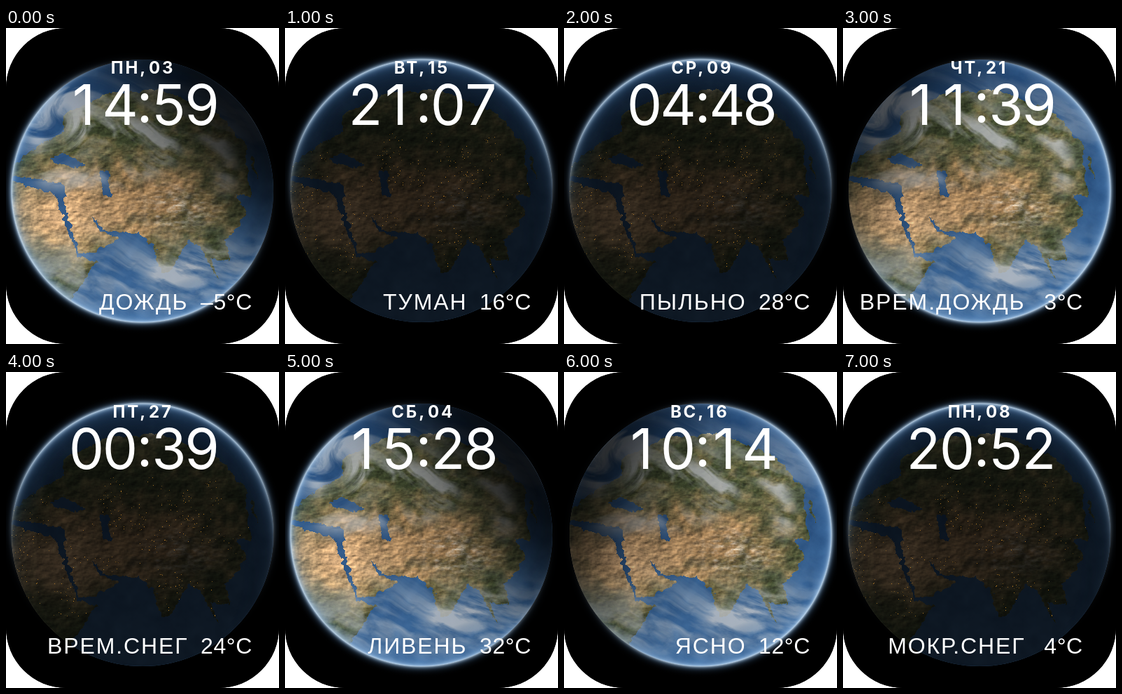
An HTML page with a canvas that plays this animation: 390x450 px, repeating every 8 s.

```html
<!DOCTYPE html>
<html lang="ru">
<head>
<meta charset="utf-8">
<style>
html, body { margin: 0; width: 100%; height: 100%; overflow: hidden; background: #fff; }
canvas, svg { position: absolute; left: 0; top: 0; width: 390px; height: 450px; }
canvas { background: #000; border-radius: 86px; }
text { fill: #fff; }
.clock { font: 400 80px Inter, sans-serif; text-anchor: middle; }
.date { font: 700 24px Inter, sans-serif; letter-spacing: 2.8px; }
.info { font: 32px "Liberation Sans", Arial, sans-serif; letter-spacing: 1.9px; }
.temp { letter-spacing: .6px; text-anchor: middle; }
.end { text-anchor: end; }
</style>
</head>
<body>
<canvas id="stage" width="390" height="450"></canvas>
<svg viewBox="0 0 390 450">
  <text id="day" class="date end" x="202" y="65"></text>
  <text id="num" class="date" x="204" y="65"></text>
  <g id="clock" class="clock"></g>
  <text id="weather" class="info end" x="260.5" y="401"></text>
  <text id="temp" class="info temp" x="315" y="401"></text>
</svg>
<script>
const W = 390, H = 450, CX = 195, CY = 232, R = 187;
const $ = id => document.getElementById(id);

const LAND = `M0 205L45 168 82 150 84 122 150 92 225 88 300 120 342 165 350 240 330 236 343 266 314 303
  318 332 293 326 306 362 278 312 262 303 232 348 222 348 210 308 190 293 140 287 123 265 134 288 160 298
  128 318 105 323 83 248 85 224 50 216 0 210Z
  M0 216L70 237 102 326 131 332 95 380 90 410 0 400Z M352 180L361 218 348 186Z`;
const LAKES = `M62 187L80 177 112 195 96 201Z M134 203L146 202 151 238 141 240Z`;

const clamp = v => Math.min(1, Math.max(0, v));
const mix = (a, b, t) => a.map((v, i) => v + (b[i] - v) * clamp(t));
const bell = (v, center, width) => Math.exp(-(((v - center) / width) ** 2));

function hash(x, y) {
  let h = Math.imul(x, 374761393) + Math.imul(y, 668265263) | 0;
  h = Math.imul(h ^ h >>> 13, 1274126177);
  return ((h ^ h >>> 16) >>> 0) / 4294967296;
}
function noise(x, y) {
  const i = Math.floor(x), j = Math.floor(y), ease = t => t * t * (3 - 2 * t);
  const u = ease(x - i), v = ease(y - j);
  const row = k => hash(i, k) * (1 - u) + hash(i + 1, k) * u;
  return row(j) * (1 - v) + row(j + 1) * v;
}
function fbm(x, y, octaves = 4) {
  let sum = 0, amp = .5;
  while (octaves--) {
    sum += amp * noise(x, y);
    x = x * 2 + 17; y = y * 2 + 31; amp /= 2;
  }
  return sum;
}

function layer() {
  const c = document.createElement('canvas');
  c.width = W; c.height = H;
  return c.getContext('2d', { willReadFrequently: true });
}
// paint(x, y) returns [r, g, b, a]
function paintPixels(g, paint) {
  const img = g.createImageData(W, H);
  for (let y = 0; y < H; y++) for (let x = 0; x < W; x++) img.data.set(paint(x, y), (y * W + x) * 4);
  g.putImageData(img, 0, 0);
  return g.canvas;
}

const mask = layer();
mask.fill(new Path2D(LAND));
mask.globalCompositeOperation = 'destination-out';
mask.fill(new Path2D(LAKES));
const maskData = mask.getImageData(0, 0, W, H).data;

// Coastlines are roughened by a noisy lookup
function isLand(x, y) {
  const shift = seed => 10 * (fbm(x / 7 + seed, y / 7, 3) - .44);
  const sx = Math.round(x + shift(0)), sy = Math.round(y + shift(50));
  return sx >= 0 && sx < W && sy >= 0 && sy < H && maskData[(sy * W + sx) * 4 + 3] > 127;
}

const SAND = [222, 178, 130], BROWN = [150, 118, 80], GREEN = [70, 80, 51], SNOW = [205, 200, 190];
const DEEP = [38, 74, 118], SHALLOW = [72, 118, 168];

const ground = paintPixels(layer(), (x, y) => {
  const rough = fbm(x / 16, y / 16, 5);
  if (!isLand(x, y)) return [...mix(DEEP, SHALLOW, rough * .7 + (y - 260) / 500), 255];
  const arid = 1.1 * bell(y, 245, 60) * bell(x, 160, 140) + (rough - .45) * 1.2;
  const sand = bell(x, 80, 72) * bell(y, 268, 48);
  const snow = bell(x, 245, 50) * bell(y, 258, 30) * (fbm(x / 9, y / 4) - .4) * 2
    + bell(y, 72, 20) * rough;
  const relief = fbm(x / 9, y / 6) - fbm((x + 2) / 9, (y + 2) / 6);
  const tone = .72 + rough * .6 + relief * 1.1;
  return [...mix(mix(mix(GREEN, BROWN, arid), SAND, sand), SNOW, snow).map(v => v * tone), 255];
});

function makeClouds() {
  const g = layer();
  g.lineCap = 'round';
  g.filter = 'blur(9px)';
  g.lineWidth = 24;
  g.strokeStyle = '#fffc';
  g.stroke(new Path2D(`M55 216Q150 218 195 200T235 165Q160 125 105 165
    M45 165Q40 120 78 98T105 140 M290 145Q320 170 314 225 M225 350Q265 335 310 320`));
  const cover = g.getImageData(0, 0, W, H).data;
  return paintPixels(layer(), (x, y) => {
    const dx = x - 78, dy = y - 125, turn = 3 * Math.exp(-Math.hypot(dx, dy) / 45) - .3;
    const u = dx * Math.cos(turn) - dy * Math.sin(turn), v = dx * Math.sin(turn) + dy * Math.cos(turn);
    const bend = 2 * fbm(u / 60, v / 60, 3);
    const wisp = fbm(u / 48 + bend, v / 14 + bend, 5);
    const climate = .4 * bell(y, 125, 50) + .6 * bell(y, 355, 50);
    const amount = (cover[(y * W + x) * 4 + 3] / 300 + climate) * clamp((wisp - .27) * 2.8);
    return [196, 199, 202, 255 * Math.min(.8, amount)];
  });
}
const clouds = makeClouds();

// Smooth falloff from the sunlit edge (0) to the opposite edge (1)
const falloff = (t, mid, steep) => 1 / (1 + Math.exp((t - mid) * steep));

function ramp(g, angle, color) {
  const dx = Math.cos(angle) * R, dy = Math.sin(angle) * R;
  const fill = g.createLinearGradient(CX + dx, CY + dy, CX - dx, CY - dy);
  for (let t = 0; t <= 1; t += .05) fill.addColorStop(t, color(t));
  return fill;
}

// Bright limb and outer haze on the side facing the sun
function atmosphere(angle, reach) {
  const g = layer();
  const fill = g.createRadialGradient(CX, CY, R - 45, CX, CY, R + 16);
  for (let t = 0; t <= 1; t += .02) {
    const d = t * 61 - 45;
    const alpha = d < 0 ? .25 * Math.exp(d / 15) + .6 * Math.exp(d / 4) : .85 * Math.exp(-d / 5) * (1 - t) * 4;
    const white = Math.exp(-Math.abs(d) / 5);
    const [r, gr, b] = mix([72, 135, 205], [205, 230, 252], white);
    fill.addColorStop(t, `rgba(${r},${gr},${b},${clamp(Math.min(.85, alpha) * clamp(t * 4))})`);
  }
  g.fillStyle = fill;
  g.beginPath();
  g.arc(CX, CY, R + 16, 0, 7);
  g.fill();
  g.globalCompositeOperation = 'destination-in';
  g.fillStyle = ramp(g, angle, t => `rgba(0,0,0,${falloff(t, reach, 11)})`);
  g.fillRect(0, 0, W, H);
  return g.canvas;
}

function cityLights(g) {
  for (let i = 0; i < 1500; i++) {
    const x = Math.floor(hash(i, 1) * W), y = Math.floor(150 + hash(i, 2) * 200);
    if (!isLand(x, y) || fbm(x / 30, y / 30, 2) + hash(i, 3) * .25 < .55) continue;
    g.fillStyle = `rgba(235,160,50,${.15 + .6 * hash(i, 4)})`;
    g.fillRect(x, y, 1, 1);
  }
}

function makeGlobe({ angle, mid, dark, reach, night }) {
  const g = layer();
  g.fillRect(0, 0, W, H);
  g.save();
  g.beginPath();
  g.arc(CX, CY, R, 0, 7);
  g.clip();
  g.drawImage(ground, 0, 0);
  if (!night) g.drawImage(clouds, 0, 0);
  g.globalCompositeOperation = 'multiply';
  g.fillStyle = ramp(g, angle, t => {
    const level = 255 * (dark + (1 - dark) * falloff(t, mid, 10));
    return `rgb(${level},${level},${level})`;
  });
  g.fillRect(0, 0, W, H);
  g.globalCompositeOperation = 'source-over';
  if (night) cityLights(g);
  g.restore();
  g.drawImage(atmosphere(angle, reach), 0, 0);
  return g.canvas;
}

const globes = {
  afternoon: makeGlobe({ angle: 2.4, mid: .74, dark: .06, reach: .58 }),
  later: makeGlobe({ angle: 2.5, mid: .72, dark: .05, reach: .58 }),
  noon: makeGlobe({ angle: .55, mid: .86, dark: .2, reach: .65 }),
  morning: makeGlobe({ angle: .4, mid: .78, dark: .12, reach: .62 }),
  night: makeGlobe({ angle: -Math.PI / 2, mid: -.06, dark: .24, reach: .42, night: true })
};

const scenes = [
  ['ПН', '03', '14:59', 'ДОЖДЬ', '–5', 'afternoon'],
  ['ВТ', '15', '21:07', 'ТУМАН', '16', 'night'],
  ['СР', '09', '04:48', 'ПЫЛЬНО', '28', 'night'],
  ['ЧТ', '21', '11:39', 'ВРЕМ.ДОЖДЬ', '3', 'noon'],
  ['ПТ', '27', '00:39', 'ВРЕМ.СНЕГ', '24', 'night'],
  ['СБ', '04', '15:28', 'ЛИВЕНЬ', '32', 'later'],
  ['ВС', '16', '10:14', 'ЯСНО', '12', 'morning'],
  ['ПН', '08', '20:52', 'МОКР.СНЕГ', '4', 'night']
];

const stage = $('stage').getContext('2d');
const digits = [-83, -35, 0, 35, 82].map(offset => {
  const digit = document.createElementNS('http://www.w3.org/2000/svg', 'text');
  digit.setAttribute('x', 198 + offset);
  return $('clock').appendChild(digit);
});
let shown = -1;

function show([day, num, time, weather, temp, globe]) {
  stage.drawImage(globes[globe], 0, 0);
  $('day').textContent = day + ',';
  $('num').textContent = num;
  $('weather').textContent = weather;
  $('temp').textContent = temp + '°C';
  digits.forEach((digit, i) => {
    digit.textContent = time[i];
    digit.setAttribute('dx', time[i] === '1' ? -4 : 0);
    digit.setAttribute('y', time[i] === ':' ? 134 : 138);
  });
}

function tick() {
  const index = Math.floor(performance.now() / 1000) % scenes.length;
  if (index !== shown) show(scenes[shown = index]);
  requestAnimationFrame(tick);
}
tick();
</script>
</body>
</html>
```
